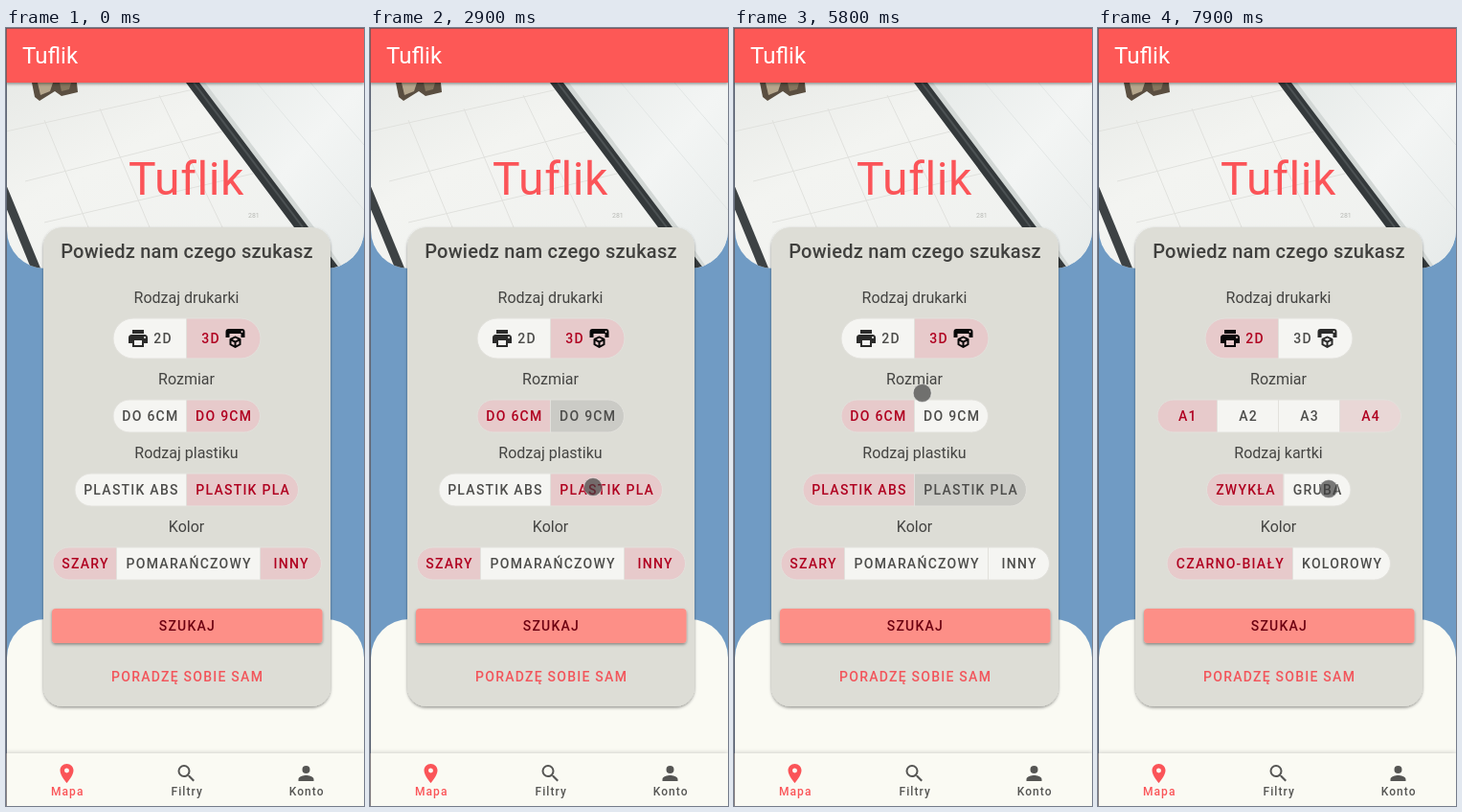
Write an HTML page that moves like this. It is 374 px wide and 812 px high and loops after 8 s.

```html
<!DOCTYPE html>
<html lang="pl">
<head>
<meta charset="utf-8">
<title>Tuflik</title>
<style>
  html, body { margin: 0; width: 100%; height: 100%; overflow: hidden; background: #709bc4; }
  svg { display: block; width: 374px; height: 812px; font-family: Roboto, sans-serif; }
  .mid { text-anchor: middle; }
  .btn { font-size: 14px; font-weight: 500; letter-spacing: 1.25px; text-anchor: middle; }
  .label { font-size: 16px; fill: #444442; text-anchor: middle; }
  .nav { font-size: 12px; font-weight: 500; letter-spacing: 1.07px; text-anchor: middle; }
</style>
</head>
<body>
<svg id="stage" viewBox="0 0 374 812">
  <defs>
    <linearGradient id="paper" x1="0" y1="0" x2="1" y2="1">
      <stop offset="0" stop-color="#e8eae7"/>
      <stop offset=".35" stop-color="#f3f4f1"/>
      <stop offset="1" stop-color="#eef0ee"/>
    </linearGradient>
    <linearGradient id="desk" x1="0" y1="0" x2="1" y2="1">
      <stop offset="0" stop-color="#e6eae8"/>
      <stop offset=".5" stop-color="#f3f5f4"/>
      <stop offset="1" stop-color="#e6eae9"/>
    </linearGradient>
    <clipPath id="photo">
      <path d="M1 57H374V211A40 40 0 0 1 334 251H41A40 40 0 0 1 1 211Z"/>
    </clipPath>
    <filter id="drop" x="-10%" y="-20%" width="120%" height="150%">
      <feDropShadow dx="0" dy="1.5" stdDeviation="1.5" flood-opacity=".4"/>
    </filter>
    <filter id="rise" x="-5%" y="-20%" width="110%" height="140%">
      <feDropShadow dx="0" dy="-1" stdDeviation="2" flood-opacity=".16"/>
    </filter>
  </defs>

  <rect width="374" height="812" fill="#709bc4"/>
  <g clip-path="url(#photo)">
    <rect y="57" width="374" height="196" fill="url(#paper)"/>
    <path d="M200 57H374V253H347Z" fill="url(#desk)"/>
    <g stroke="#e0e1dd" fill="none">
      <path d="M0 108L196 64M20 160L226 108M40 203L258 152M98 84L150 208M40 96L86 208M160 70L226 208"/>
      <path d="M262 57L374 190M318 57L374 122" stroke="#e2e6e5"/>
    </g>
    <path d="M0 163L37 253H27L0 187Z" fill="#3d4244"/>
    <path d="M27 57H74L75 67L58 71L51 66L35 76L30 72Z" fill="#5a4e40"/>
    <path d="M33 57H49L46 66L36 70Z" fill="#b5a68c"/>
    <path d="M56 57H68L66 64L58 66Z" fill="#85765e"/>
    <path d="M200 57H208L322 208L354 253H346Z" fill="#d3d8d6"/>
    <path d="M188 57H202L316 208L350 253H335L301 208Z" fill="#34393b"/>
    <path d="M196 57L310 208" stroke="#4c5254" stroke-width="2"/>
    <text x="253" y="198" font-size="7" fill="#b9bab6">281</text>
  </g>
  <path d="M1 812V657A40 40 0 0 1 41 617H334A40 40 0 0 1 374 657V812Z" fill="#fafaf3"/>

  <rect width="374" height="57" fill="#fd5857" filter="url(#drop)"/>
  <text x="17" y="37" font-size="24" fill="#fff">Tuflik</text>
  <text class="mid" x="188.5" y="174" font-size="48" letter-spacing=".6" fill="#fb5458">Tuflik</text>

  <rect x="39" y="208" width="300" height="500" rx="20" fill="#ddddd6" filter="url(#drop)"/>
  <text class="mid" x="189" y="240" font-size="20" font-weight="500" letter-spacing=".25" fill="#40403e">Powiedz nam czego szukasz</text>
  <text class="label" x="188.5" y="287">Rodzaj drukarki</text>
  <text class="label" x="188.5" y="372">Rozmiar</text>
  <text class="label" x="188.5" y="449" id="material">Rodzaj plastiku</text>
  <text class="label" x="188.5" y="526">Kolor</text>
  <g id="kind"></g>
  <g id="solid"></g>
  <g id="flat"></g>
  <rect x="48" y="606" width="282.5" height="36" rx="4" fill="#fd8f87" filter="url(#drop)"/>
  <text class="btn" x="189.4" y="629" fill="#6d0011">SZUKAJ</text>
  <text class="btn" x="189.6" y="682" fill="#f2555b">PORADZĘ SOBIE SAM</text>

  <rect y="757" width="374" height="55" fill="#fafaf3" filter="url(#rise)"/>
  <g id="nav"></g>
  <path d="M.5 0V812M0 .5H374" stroke="#5b5358" stroke-opacity=".7" fill="none"/>
  <circle id="touch" r="9.5" fill="#3c3c3c" fill-opacity=".68" stroke="#fff" stroke-opacity=".45"/>
</svg>
<script>
const LOOP = 8000, STEP = 100, SWAP = 6200;
const $ = id => document.getElementById(id);

function add(parent, tag, attrs, text) {
  const node = document.createElementNS('http://www.w3.org/2000/svg', tag);
  for (const key in attrs) node.setAttribute(key, attrs[key]);
  if (text) node.textContent = text;
  return parent.appendChild(node);
}

const icons = {
  pin: 'M12 2C8.13 2 5 5.13 5 9c0 5.25 7 13 7 13s7-7.75 7-13c0-3.87-3.13-7-7-7zm0 9.5a2.5 2.5 0 0 1 0-5 2.5 2.5 0 0 1 0 5z',
  search: 'M15.5 14h-.79l-.28-.27A6.47 6.47 0 0 0 16 9.5 6.5 6.5 0 1 0 9.5 16c1.61 0 3.09-.59 4.23-1.57l.27.28v.79l5 4.99L20.49 19l-4.99-5zm-6 0a4.5 4.5 0 1 1 0-9 4.5 4.5 0 0 1 0 9z',
  person: 'M12 12a4 4 0 1 0 0-8 4 4 0 0 0 0 8zm0 2c-2.67 0-8 1.34-8 4v2h16v-2c0-2.66-5.33-4-8-4z',
  printer: 'M19 8H5c-1.66 0-3 1.34-3 3v6h4v4h12v-4h4v-6c0-1.66-1.34-3-3-3zm-3 11H8v-5h8v5zm3-7a1 1 0 1 1 0-2 1 1 0 0 1 0 2zM18 3H6v4h12z',
  cube: 'M19 6a1 1 0 1 0 0-2 1 1 0 0 0 0 2zM19 2a3 3 0 0 1 3 3v6h-4V7H6v4H2V5a3 3 0 0 1 3-3z' +
    'M18 18.2q0 .6-.5.9l-4.9 2.7q-.6.3-1.2 0l-4.9-2.7q-.5-.3-.5-.9V13q0-.6.5-.9l4.9-2.4q.6-.3 1.2 0l4.9 2.4q.5.3.5.9z' +
    'M12 11.6L9 13l3 1.6 3-1.6zM8 17.7l3 1.6v-3l-3-1.6zM16 17.7v-3l-3 1.6v3z'
};
const icon = (parent, name, x, y, fill) => add(parent, 'path',
  { d: icons[name], fill, 'fill-rule': 'evenodd', transform: `translate(${x} ${y})` });

[['pin', 'Mapa', 63.5, '#fa5458'], ['search', 'Filtry', 188.5, '#555553'], ['person', 'Konto', 313.5, '#555553']]
  .forEach(([name, text, x, fill]) => {
    icon($('nav'), name, x - 12, 766, fill);
    add($('nav'), 'text', { class: 'nav', x: x + .7, y: 801, fill }, text);
  });

// look: [background, text]
const looks = {
  off: ['#f5f5f2', '#4d4d4b'], on: ['#e7cacb', '#b00020'], hot: ['#e4a9ae', '#b00020'],
  grey: ['#cbcbc6', '#4d4d4b'], dark: ['#cacbc6', '#1c1c1c'], dim: ['#e6e6e2', '#4d4d4b'],
  soft: ['#ebe0de', '#b00020'], pale: ['#e9d7d6', '#b00020']
};

// Time and look pairs; the look holds until the next time.
const steps = {
  '2D': [0, 'off', SWAP, 'hot', 7700, 'on'],
  '3D': [0, 'on', SWAP, 'pale', 6300, 'off'],
  'DO 6CM': [0, 'off', 1600, 'dim', 1700, 'soft', 2000, 'on'],
  'DO 9CM': [0, 'on', 1000, 'hot', 1700, 'on', 2000, 'dark', 2400, 'grey', 3200, 'dim', 3400, 'off'],
  'PLASTIK ABS': [0, 'off', 3200, 'dim', 3300, 'soft', 4300, 'on'],
  'PLASTIK PLA': [0, 'on', 4900, 'dark', 5400, 'grey'],
  'SZARY': [0, 'on'],
  'INNY': [0, 'on', 4000, 'dark', 4400, 'grey', 4900, 'dim', 5100, 'off'],
  'A1': [0, 'on'],
  'A4': [0, 'off', 7600, 'dim', 7700, 'soft', 7900, 'pale'],
  'ZWYKŁA': [0, 'on'],
  'CZARNO-BIAŁY': [0, 'on']
};

const buttons = [];
function row(group, top, height, edges, names) {
  const parent = $(group), low = top + height, r = height / 2;
  names.forEach((name, i) => {
    const x0 = edges[i], x1 = edges[i + 1];
    const a = i ? 0 : r, b = i < names.length - 1 ? 0 : r;
    const box = add(parent, 'path', {
      d: `M${x0 + a} ${top}H${x1 - b}A${b} ${b} 0 0 1 ${x1} ${top + b}V${low - b}A${b} ${b} 0 0 1 ${x1 - b} ${low}` +
         `H${x0 + a}A${a} ${a} 0 0 1 ${x0} ${low - a}V${top + a}A${a} ${a} 0 0 1 ${x0 + a} ${top}Z`,
      stroke: '#e2e1dc'
    });
    const x = name === '2D' ? 164 : name === '3D' ? 214 : (x0 + x1) / 2 + .7;
    const text = add(parent, 'text', { class: 'btn', x, y: top + r + 5 }, name);
    const mark = name === '2D' ? icon(parent, 'printer', 126, 312)
      : name === '3D' ? icon(parent, 'cube', 227.5, 312) : null;
    buttons.push({ box, text, mark, plan: steps[name] || [0, 'off'] });
  });
}

row('kind', 303, 42, [112, 188.5, 266], ['2D', '3D']);
row('solid', 388, 34, [112, 188.5, 265.5], ['DO 6CM', 'DO 9CM']);
row('solid', 465, 34, [72, 188.5, 305.5], ['PLASTIK ABS', 'PLASTIK PLA']);
row('solid', 542, 34, [49, 115.5, 265.5, 329.5], ['SZARY', 'POMARAŃCZOWY', 'INNY']);
row('flat', 388, 34, [62, 124.5, 188.5, 252.5, 316.5], ['A1', 'A2', 'A3', 'A4']);
row('flat', 465, 34, [113.5, 194, 264], ['ZWYKŁA', 'GRUBA']);
row('flat', 542, 34, [72, 203.5, 305.5], ['CZARNO-BIAŁY', 'KOLOROWY']);

// Touch point: [time, x, y]
const path = [
  [700, 272, 352], [1000, 230, 408], [1200, 226, 410], [1400, 165, 415], [1700, 158, 411],
  [2000, 226, 408], [2600, 229, 410], [2900, 233, 479], [3200, 135, 484], [3400, 138, 486],
  [3700, 334, 585], [3800, 334, 585], [4000, 309, 570], [4100, 309, 569], [4400, 305, 563],
  [4600, 267, 496], [4900, 267, 496], [5300, 250, 470], [5600, 212, 408], [5700, 212, 408],
  [6000, 166, 327], [6200, 164, 325], [6500, 164, 325], [6600, 167, 355], [6800, 217, 410],
  [6900, 217, 410], [7000, 205, 411], [7200, 260, 409], [7300, 261, 408], [7400, 280, 408],
  [7700, 280, 408], [7900, 241, 481]
];

function place(t) {
  const i = path.findIndex(p => p[0] > t);
  if (i < 0) return path[path.length - 1].slice(1);
  const [t0, x0, y0] = path[i - 1], [t1, x1, y1] = path[i];
  const k = (t - t0) / (t1 - t0);
  return [x0 + (x1 - x0) * k, y0 + (y1 - y0) * k];
}

function lookAt(plan, t) {
  let name = plan[1];
  for (let i = 2; i < plan.length && plan[i] <= t; i += 2) name = plan[i + 1];
  return name;
}

function draw(t) {
  const flat = t >= SWAP;
  $('solid').style.display = flat ? 'none' : '';
  $('flat').style.display = flat ? '' : 'none';
  $('material').textContent = flat ? 'Rodzaj kartki' : 'Rodzaj plastiku';
  for (const { box, text, mark, plan } of buttons) {
    const name = lookAt(plan, t);
    box.setAttribute('fill', looks[name][0]);
    text.setAttribute('fill', looks[name][1]);
    if (mark) mark.setAttribute('fill', name === 'off' ? '#2b2b2a' : '#080808');
  }
  const shown = t >= path[0][0];
  $('touch').style.display = shown ? '' : 'none';
  if (shown) $('touch').setAttribute('transform', `translate(${place(t)})`);
}

const start = performance.now();
function tick() {
  const t = (performance.now() - start) % LOOP;
  draw(Math.floor(t / STEP) * STEP);
  requestAnimationFrame(tick);
}
tick();
</script>
</body>
</html>
```
